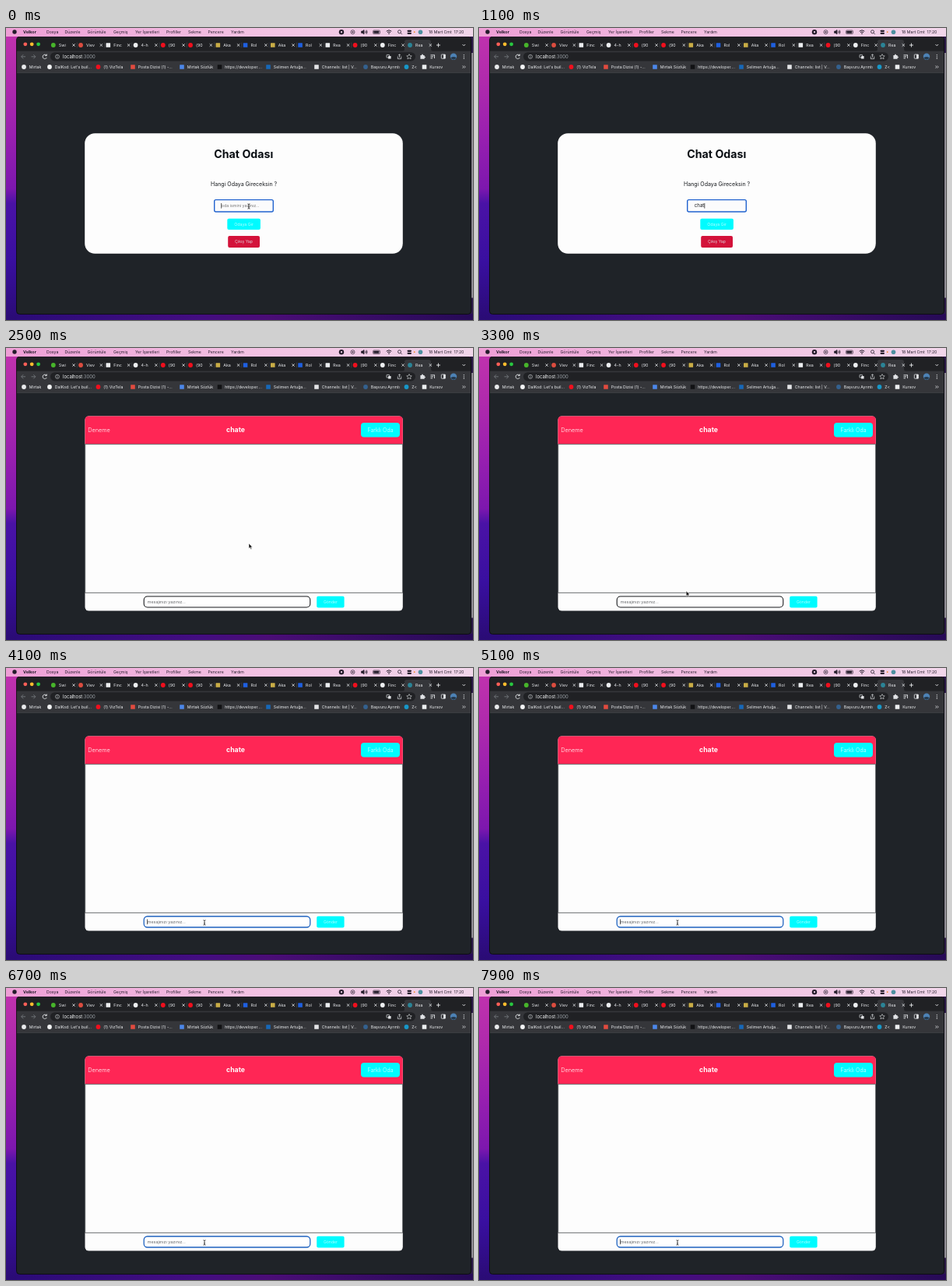
Recreate the animation shown at these times as an HTML page. Size 600x375 px, loop 8 s.

```html
<!DOCTYPE html>
<html lang="tr">
<head>
<meta charset="utf-8">
<title>Chat Odası</title>
<style>
  html, body { margin: 0; width: 100%; height: 100%; overflow: hidden; background: #1f2328; }
  svg { display: block; width: 100vw; height: 100vh; }
  text { font-family: Inter, "Open Sans", sans-serif; white-space: pre; }
</style>
</head>
<body>
<svg id="stage" viewBox="0 0 600 375" preserveAspectRatio="none">
  <defs>
    <linearGradient id="wall" x2="0" y2="1">
      <stop offset="0" stop-color="#c233ae"/>
      <stop offset=".18" stop-color="#b02aac"/>
      <stop offset=".36" stop-color="#9a20b0"/>
      <stop offset=".55" stop-color="#7d17ae"/>
      <stop offset=".6" stop-color="#4a12a6"/>
      <stop offset=".8" stop-color="#390fa0"/>
      <stop offset="1" stop-color="#2a0b74"/>
    </linearGradient>
    <linearGradient id="floor">
      <stop offset="0" stop-color="#2b0b78"/>
      <stop offset=".4" stop-color="#430d80"/>
      <stop offset=".55" stop-color="#4a0d76"/>
      <stop offset="1" stop-color="#260a56"/>
    </linearGradient>
    <linearGradient id="menu">
      <stop offset="0" stop-color="#ee9fd6"/>
      <stop offset=".5" stop-color="#f2c0e2"/>
      <stop offset="1" stop-color="#f1d6ea"/>
    </linearGradient>
  </defs>
  <g id="desktop"></g>
  <g id="lobby"></g>
  <g id="room"></g>
  <g id="arrow">
    <path d="M0 0V6.4L1.5 5.1L2.6 7.4L3.7 6.9L2.7 4.7H4.6Z" fill="#111" stroke="#fff" stroke-width=".5"/>
  </g>
  <g id="beam" fill="none">
    <path d="M-1.5-3.2Q0-3.2 0-2.2Q0-3.2 1.5-3.2M0-2.4V2.4M-1.5 3.2Q0 3.2 0 2.2Q0 3.2 1.5 3.2M-.8.8H.8" stroke="#222" stroke-width=".8"/>
  </g>
</svg>
<script>
const LOOP = 8000;
const ENTER_ROOM = 2300;
const FOCUS_MESSAGE = 3800;
const $ = id => document.getElementById(id);

function add(parent, tag, attrs, content) {
  const el = document.createElementNS('http://www.w3.org/2000/svg', tag);
  for (const key in attrs) el.setAttribute(key, attrs[key]);
  if (content !== undefined) el.textContent = content;
  parent.appendChild(el);
  return el;
}
const rect = (p, x, y, width, height, fill, rx = 0, more = {}) =>
  add(p, 'rect', { x, y, width, height, fill, rx, ...more });
const dot = (p, cx, cy, r, fill, more = {}) => add(p, 'circle', { cx, cy, r, fill, ...more });
const path = (p, d, stroke, width = .8, fill = 'none') =>
  add(p, 'path', { d, stroke, 'stroke-width': width, fill });
const label = (p, x, y, size, fill, content, more = {}) =>
  add(p, 'text', { x, y, 'font-size': size, fill, ...more }, content);
const centred = { 'text-anchor': 'middle' };
const bold = { 'font-weight': 700 };
const light = { 'font-weight': 300 };
const show = (el, on) => el.setAttribute('visibility', on ? 'visible' : 'hidden');

// Round icons by default, square ones when asked.
function badge(p, x, y, fill, square) {
  if (square) rect(p, x - 2.8, y - 2.8, 5.6, 5.6, fill, .5);
  else dot(p, x, y, 2.9, fill);
}

function drawMenuBar(p) {
  const ink = '#241c2b';
  rect(p, 0, 0, 600, 11, 'url(#menu)');
  dot(p, 11, 5, 2.7, ink);
  label(p, 22, 7, 5.4, ink, 'Velkor', bold);
  const items = [[52, 'Dosya'], [75.5, 'Düzenle'], [104.5, 'Görüntüle'], [138, 'Geçmiş'],
    [166, 'Yer İşaretleri'], [206, 'Profiller'], [234, 'Sekme'], [259.5, 'Pencere'], [289, 'Yardım']];
  for (const [x, name] of items) label(p, x, 7, 5.2, ink, name);

  dot(p, 431, 5.2, 3.2, ink);
  rect(p, 430, 4.2, 2, 2, '#f2cbe5');
  dot(p, 445.5, 5.2, 2.5, 'none', { stroke: ink, 'stroke-width': .7 });
  dot(p, 445.5, 5.2, 1, ink);
  path(p, 'M456.5 4H458L460 2.4V8L458 6.4H456.5ZM461.5 3.5Q462.8 5.2 461.5 6.9M463 2.6Q465 5.2 463 7.8', ink, .6, ink);
  rect(p, 471.5, 3, 9, 4.6, 'none', 1.2, { stroke: ink, 'stroke-width': .6 });
  rect(p, 472.3, 3.8, 7, 3, ink, .5);
  path(p, 'M488.7 4.2Q492 1.3 495.3 4.2M490 5.8Q492 4 494 5.8', ink, 1);
  dot(p, 492, 7.3, .8, ink);
  dot(p, 505.5, 4.8, 2, 'none', { stroke: ink, 'stroke-width': .8 });
  path(p, 'M507 6.3L508.8 8.1', ink);
  rect(p, 515.5, 2.7, 5.5, 2.2, ink, 1.1);
  rect(p, 515.5, 5.7, 5.5, 2.2, ink, 1.1);
  dot(p, 524.7, 5.2, .9, '#ee8a2c');
  dot(p, 532.5, 5.2, 2.8, '#4d8fa0');
  label(p, 543, 7, 5.2, ink, '18 Mart Cmt  17:20');
}

function drawTabs(p) {
  ['#ff5f57', '#febc2e', '#28c840'].forEach((c, i) => dot(p, 24.8 + i * 8.4, 20.8, 2.4, c));
  const white = '#eceef0', red = '#f00f1d', gold = '#c9ad46', blue = '#1e5fe0';
  const tabs = [['Swi', '#47b52b'], ['Viev', '#db4c3f'], ['Finc', white, 1], ['4-h', white],
    ['(90', red], ['(90', red], ['Aka', gold, 1], ['Rol', blue, 1], ['Aka', gold, 1],
    ['Rol', blue, 1], ['Rea', white, 1], ['(90', red], ['Finc', white], ['Rea', '#2b8496']];
  path(p, 'M509 30Q512 30 512 27V18Q512 15 515 15H543Q546 15 546 18V27Q546 30 549 30Z', 'none', 0, '#35363a');
  tabs.forEach(([name, fill, square], i) => {
    const x = 60.8 + i * 35.25;
    badge(p, x, 22, fill, square);
    label(p, x + 7, 24, 5.3, '#e8eaed', name);
    path(p, `M${x + 24.6} 20.3l3.4 3.4m0-3.4l-3.4 3.4`, '#e8eaed', .8);
    if (i < 12) path(p, `M${x + 30.5} 18.5v7`, '#55575c', .5);
  });
  path(p, 'M553 22h5m-2.5-2.5v5', '#e8eaed', .9);
  path(p, 'M586.5 21l1.8 1.8l1.8-1.8', '#e8eaed', .9);
}

function drawToolbar(p) {
  const ink = '#e0e2e5', faint = '#7c7f84';
  path(p, 'M25 36.8H19.8M22.2 34.2L19.6 36.8L22.2 39.4', faint, .8);
  path(p, 'M32.5 36.8H37.7M35.3 34.2L37.9 36.8L35.3 39.4', faint, .8);
  path(p, 'M52 35.2A2.7 2.7 0 1 0 52.3 38M52.3 33.5V35.6H50.2', ink, .9);
  rect(p, 57, 31.2, 469, 11.2, '#202124', 5.6);
  dot(p, 66, 36.8, 2.5, 'none', { stroke: '#b9bcc0', 'stroke-width': .7 });
  path(p, 'M66 36.4V38.3M66 35.1V35.7', '#b9bcc0', .7);
  const address = label(p, 73, 38.9, 5.9, '#f1f3f4', 'localhost');
  add(address, 'tspan', { fill: '#9aa0a6' }, ':3000');

  rect(p, 489, 34.4, 3.6, 3.6, 'none', .4, { stroke: ink, 'stroke-width': .7 });
  rect(p, 491, 36, 3.6, 3.6, ink, .4);
  path(p, 'M503.3 36.5V39.6H507.7V36.5M505.5 38V33.8M504 35.2L505.5 33.7L507 35.2', ink, .7);
  path(p, 'M518 33.5l1 2.2 2.3.2-1.7 1.6.5 2.3-2.1-1.2-2.1 1.2.5-2.3-1.7-1.6 2.3-.2Z', ink, .6);
  path(p, 'M532.4 35H534Q534 33.4 535 33.4Q536 33.4 536 35H537.6V36.5Q539 36.5 539 37.4Q539 38.3 537.6 38.3V39.8H532.4Z', 'none', 0, ink);
  path(p, 'M545.5 34.8H551M545.5 36.8H549M545.5 38.8H548M550.5 35V39', ink, .9);
  rect(p, 559.3, 34, 5.2, 5.2, 'none', .6, { stroke: ink, 'stroke-width': .8 });
  rect(p, 562, 34, 2.5, 5.2, ink);
  dot(p, 575, 36.7, 4.2, '#4d82b5');
  path(p, 'M571.2 38.3Q575 35.5 578.8 38.3Q575 43 571.2 38.3Z', 'none', 0, '#25384a');
  for (const y of [34.6, 36.8, 39]) dot(p, 588.3, y, .65, ink);
}

function drawBookmarks(p) {
  const marks = [[23, 'Mirtak', '#e9eaec'], [56, "DalKod: Let's buil...", '#f2f3f4'],
    [118.5, '(1) VizTela', '#f00f1d'], [163, 'Posta Dizisi (1) -...', '#e14b3f', 1],
    [226, 'Mirtak Sözlük', '#4c87ea', 1], [274.5, 'https://developer....', '#111214', 1],
    [337, 'Selimen Artuğa...', '#1768b8', 1], [399, 'Channels: list | V...', '#e4e5e7', 1],
    [462, 'Başvuru Ayrıntı', '#34618f'], [514.5, 'Z<', '#1797c8'], [537.5, 'Kursov', '#eceef0', 1]];
  for (const [x, name, fill, square] of marks) {
    badge(p, x, 50, fill, square);
    label(p, x + 6.8, 51.9, 5.2, '#eceef0', name);
  }
  path(p, 'M586.5 48.4l1.5 1.6l-1.5 1.6m2.2-3.2l1.5 1.6l-1.5 1.6', '#e8eaed', .7);
}

function drawDesktop(p) {
  rect(p, 0, 0, 600, 375, 'url(#wall)');
  rect(p, 14, 364, 586, 11, 'url(#floor)');
  rect(p, 596, 11, 4, 356, '#2a1846');
  rect(p, 597.8, 32, 2.2, 314.5, '#8f8c94');
  rect(p, 13.5, 11.2, 584, 356.3, '#1f2328', 4, { stroke: '#08090b', 'stroke-width': .8 });
  path(p, 'M14 30V15.5Q14 11.6 18 11.6H593Q597 11.6 597 15.5V30Z', 'none', 0, '#202124');
  rect(p, 14, 29.6, 583, 27.6, '#35363a');
  rect(p, 14, 57, 583, .6, '#4b4d51');
  drawMenuBar(p);
  drawTabs(p);
  drawToolbar(p);
  drawBookmarks(p);
}

function button(p, x, y, w, h, fill, size, name, rx = 2) {
  rect(p, x, y, w, h, fill, rx);
  label(p, x + w / 2, y + h / 2 + size * .36, size, '#e2ffff', name, { ...centred, ...light });
}

function drawLobby(p) {
  rect(p, 101.2, 135.2, 408.6, 154.6, '#fdfdfd', 13);
  label(p, 305.3, 167, 14.2, '#0b0f14', 'Chat Odası', { ...centred, ...bold });
  label(p, 305.6, 203, 7, '#15181c', 'Hangi Odaya Gireceksin ?', centred);
  rect(p, 267.7, 220.6, 75.6, 15.4, '#fbfbfc', 2, { stroke: '#2163cf', 'stroke-width': 1.4 });
  button(p, 284.3, 244.7, 42.6, 14.4, '#00fbff', 5.4, 'Odaya Gir');
  button(p, 285.2, 267, 40.8, 15, '#d3123a', 5.4, 'Çıkış Yap');
  return {
    text: label(p, 276.8, 230.2, 5.3, '#777', ''),
    caret: rect(p, 276.4, 225, .7, 6.6, '#111')
  };
}

function drawRoom(p) {
  rect(p, 101.5, 87.6, 408.3, 250, '#fdfdfd', 5);
  path(p, 'M101.5 123.3V92.5Q101.5 87.6 106.5 87.6H505Q509.8 87.6 509.8 92.5V123.3Z', 'none', 0, '#ff2655');
  path(p, 'M101.7 123.6V314.4H509.6V123.6Z', '#33363a', .7);
  label(p, 105.2, 107.9, 7.3, '#fff', 'Deneme', light);
  label(p, 295, 108.1, 8.7, '#fff', 'chate', { ...centred, ...bold });
  button(p, 456, 96, 50, 18.6, '#00fbff', 7.1, 'Farklı Oda', 4);
  const box = rect(p, 177.2, 319, 213.6, 14, '#fff', 4.5);
  label(p, 181.7, 327.9, 5.4, '#66686b', 'mesajınızı yazınız...');
  button(p, 399.2, 318.8, 35.4, 14.8, '#00fbff', 5.2, 'Gönder');
  return { box, caret: rect(p, 181.3, 322.6, .7, 6.6, '#111') };
}

drawDesktop($('desktop'));
const lobby = drawLobby($('lobby'));
const room = drawRoom($('room'));

const keyTimes = [500, 700, 850, 1050, 1250];
const stops = [[0, 312, 229], [1500, 312, 229], [1950, 309, 257.5], [2300, 309, 257],
  [2500, 312, 251], [2800, 312, 251], [3500, 255, 327], [LOOP, 255, 327]];

function pointerAt(t) {
  const i = stops.findIndex((s, n) => n && t <= s[0]);
  const [t0, x0, y0] = stops[i - 1], [t1, x1, y1] = stops[i];
  const u = (t - t0) / (t1 - t0), e = u * u * (3 - 2 * u);
  return [x0 + (x1 - x0) * e, y0 + (y1 - y0) * e];
}

function render(t) {
  const inRoom = t >= ENTER_ROOM;
  show($('lobby'), !inRoom);
  show($('room'), inRoom);

  const typed = 'chate'.slice(0, keyTimes.filter(k => t >= k).length);
  lobby.text.textContent = typed || 'oda ismini yazınız...';
  lobby.text.setAttribute('fill', typed ? '#17191c' : '#777');
  lobby.text.setAttribute('font-size', typed ? 6.1 : 5.3);
  const caretX = typed ? 277 + lobby.text.getComputedTextLength() : 276.4;
  lobby.caret.setAttribute('x', caretX);
  show(lobby.caret, !inRoom && t < 1750);

  const focused = t >= FOCUS_MESSAGE;
  room.box.setAttribute('stroke', focused ? '#1f63c0' : '#17191c');
  room.box.setAttribute('stroke-width', focused ? 1.3 : 1.1);
  show(room.caret, focused && (t - FOCUS_MESSAGE) % 1000 < 500);

  const [x, y] = pointerAt(t);
  const overInput = inRoom ? y > 319 : y < 236;
  const typing = t >= keyTimes[0] && t < 1500;
  for (const id of ['arrow', 'beam']) $(id).setAttribute('transform', `translate(${x} ${y})`);
  show($('arrow'), !overInput);
  show($('beam'), overInput && !typing);
}

function tick() {
  render(performance.now() % LOOP);
  requestAnimationFrame(tick);
}
tick();
</script>
</body>
</html>
```
